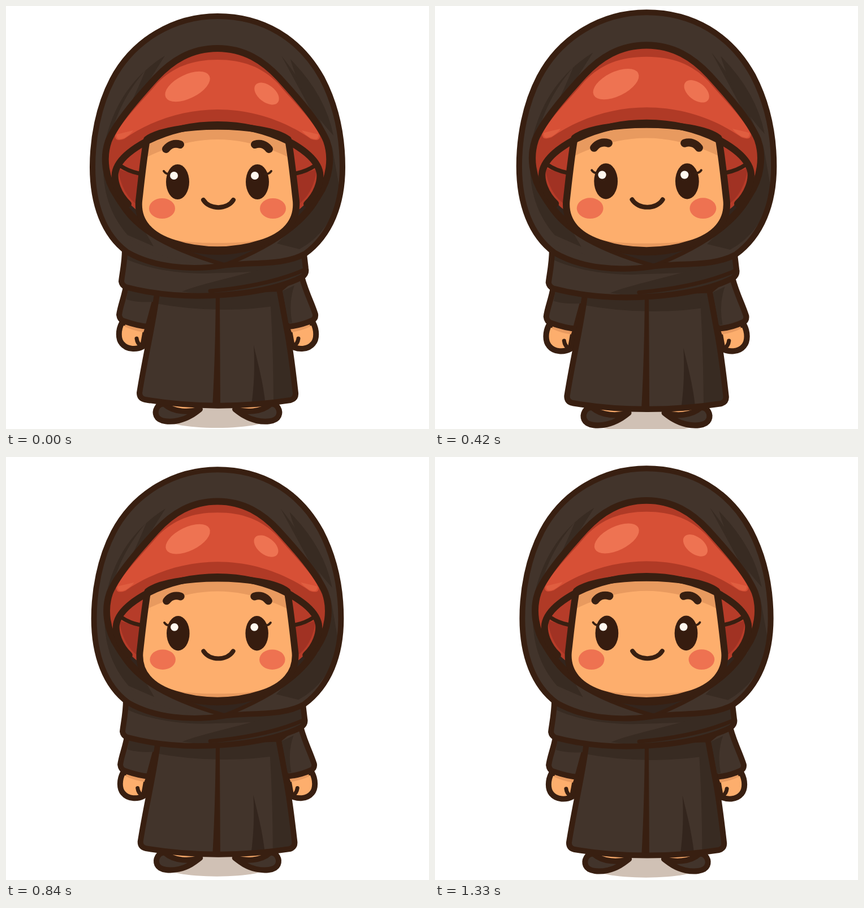
These frames come from a looping animation (748x748 px, 1400 ms). An HTML page:

```html
<!DOCTYPE html>
<html lang="en">
<head>
<meta charset="utf-8">
<title>Breathing character</title>
<style>
html, body { margin: 0; width: 100%; height: 100%; overflow: hidden; background: #fff; }
svg { display: block; width: 100vw; height: 100vh; }
.line { fill: none; stroke: #381f11; stroke-width: 10; stroke-linecap: round; stroke-linejoin: round; }
.thin { stroke-width: 7; }
.bold { stroke-width: 12; }
.cloth { fill: #42342b; }
.shade { fill: #382b22; }
.deep { fill: #33251d; }
.ink { fill: #361c0f; }
.skin { fill: #fdae6d; }
.tan { fill: #e89a5f; }
.red { fill: #d75036; }
.dark-red { fill: #b03a26; }
.glow { fill: #ee7352; }
</style>
</head>
<body>
<svg viewBox="0 0 748 748">
<defs>
  <path id="hood" d="M375 18C298 18 226 60 189 130C164 178 154 235 154 285C154 350 174 405 215 435C262 462 325 468 385 459C440 452 490 460 530 438C575 405 596 350 596 285C596 230 586 178 560 128C521 57 455 18 375 18Z"/>
  <path id="opening" d="M375 75C328 75 294 97 266 127C236 160 196 205 182 239C172 268 176 305 197 336C222 378 280 434 375 434C470 434 528 378 553 336C574 305 578 268 568 239C554 205 514 160 484 127C456 97 422 75 375 75Z"/>
  <path id="face" d="M250 236C244 270 240 310 236 345C233 381 256 407 300 420C345 435 405 435 450 420C494 407 517 381 514 345C510 310 506 270 500 236C460 205 290 205 250 236Z"/>
  <path id="robe" d="M268 508C262 560 247 620 237 684Q237 694 247 696C330 710 420 710 504 697Q514 694 513 684C508 640 503 600 497 570L484 500Z"/>
  <path id="shawl" d="M211 430C211 455 206 475 205 487Q206 494 213 497C270 512 330 515 385 511C440 507 490 497 525 479Q533 473 531 464L527 430Z"/>
  <clipPath id="inHood"><use href="#hood"/></clipPath>
  <clipPath id="inOpening"><use href="#opening"/></clipPath>
  <clipPath id="inFace"><use href="#face"/></clipPath>
  <clipPath id="inRobe"><use href="#robe"/></clipPath>
  <clipPath id="inShawl"><use href="#shawl"/></clipPath>

  <g id="shoe">
    <path class="skin" d="M280 698H345V714L300 722L280 712Z"/>
    <path class="line cloth" d="M281 704C269 702 263 716 267 725C272 736 292 736 306 733C323 729 334 721 344 713C325 719 298 719 281 704Z"/>
  </g>
  <g id="hand">
    <path class="line skin" d="M206 560C199 573 199 589 206 597C215 608 232 608 243 602L250 563Z"/>
    <path class="tan" d="M212 563L246 571L244 577Q226 574 211 567Z"/>
    <path class="line thin" d="M232 588Q233 597 241 602"/>
  </g>
  <g id="gills">
    <path d="M196 300C200 280 225 260 250 245L238 365C215 350 198 325 196 300Z" fill="#b63c29"/>
    <path d="M199 288Q216 295 238 298L234 352Q206 334 199 288Z" fill="#a13223"/>
    <path class="line thin" d="M204 283Q217 292 236 296"/>
  </g>
  <g id="cheekEye">
    <ellipse class="ink" cx="304.500" cy="311" rx="20.500" ry="31"/>
    <path class="line" style="stroke-width:4" d="M280 292Q284 298 292 297"/>
    <path class="line" style="stroke-width:14" d="M284 253C290 245 299 242 309 245"/>
    <ellipse cx="277" cy="358" rx="23" ry="18" fill="#ee7251"/>
  </g>
</defs>

<g id="figure">
  <ellipse cx="374" cy="727" rx="98" ry="19" fill="#d0c1b5"/>
  <use href="#shoe"/>
  <use href="#shoe" transform="matrix(-1 0 0 1 750 0)"/>
  <use href="#hand"/>
  <use href="#hand" transform="matrix(-1 0 0 1 750 0)"/>

  <path class="line cloth" d="M213 496C210 515 203 530 201 546Q202 555 209 557Q235 566 252 567L268 508Z"/>
  <path class="shade" d="M217 502L264 512L261 523Q235 525 214 519Z"/>
  <path class="line cloth" d="M522 470C528 500 540 520 548 545Q549 553 542 556Q520 566 498 567L484 502Z"/>
  <path class="shade" d="M490 504L511 494Q500 525 507 560L500 561Z"/>

  <use href="#robe" class="cloth"/>
  <g clip-path="url(#inRobe)">
    <path class="shade" d="M260 500H500L500 527Q380 548 260 525Z"/>
    <path class="shade" d="M468 515C472 580 474 640 474 710H520L485 500Z"/>
    <path class="deep" d="M439 600C441 635 440 670 435 706H460C456 665 446 630 439 600Z"/>
    <path d="M372 510H379L380 710H366Q371 620 372 510Z" fill="#381f11"/>
  </g>
  <use href="#robe" class="line"/>

  <use href="#shawl" class="cloth"/>
  <g clip-path="url(#inShawl)">
    <path class="shade" d="M205 430H540V446C480 474 420 470 350 473C290 473 235 460 205 443Z"/>
    <path class="shade" d="M312 505C350 489 420 478 535 440V490L390 515Z"/>
    <path class="line thin" d="M362 504C430 498 485 486 530 466"/>
  </g>
  <use href="#shawl" class="line"/>

  <use href="#hood" class="cloth"/>
  <g clip-path="url(#inHood)">
    <path class="shade" d="M282 88C222 125 188 180 174 250C169 310 177 360 216 405L262 425L190 300L205 210Z"/>
    <path class="cloth" d="M248 113C215 151 194 193 184 240Q214 195 248 113Z"/>
    <path class="shade" d="M488 88C530 140 546 178 578 250L592 330Q575 400 520 430L480 420L555 345L565 230Z"/>
    <path class="shade" d="M504 94Q525 170 580 229Q566 157 504 94Z"/>
    <path class="deep" d="M184 300C205 370 250 420 385 459C490 420 545 370 570 300L545 335L375 430L205 335Z"/>
    <path class="line thin" d="M190 318C207 380 265 423 385 457"/>
    <path class="line thin" d="M563 319C545 368 497 415 385 459"/>
    <path class="cloth" d="M215 405C247 440 315 455 370 458Q290 468 226 432Z"/>
  </g>
  <use href="#hood" class="line"/>

  <g clip-path="url(#inOpening)">
    <use href="#opening" class="dark-red"/>
    <path class="red" d="M375 95C330 95 296 108 268 137C241 169 206 203 194 229Q193 241 210 235C260 200 320 183 375 183C432 183 490 200 540 235Q557 241 556 229C544 203 509 169 482 137C454 108 420 95 375 95Z"/>
    <path class="glow" d="M197 227Q195 240 211 233Q221 227 226 220Q209 224 197 227ZM553 227Q555 240 539 233Q529 227 524 220Q541 224 553 227Z" opacity=".4"/>
    <ellipse class="glow" cx="322" cy="142.500" rx="43" ry="21" transform="rotate(-26 322 142.500)"/>
    <ellipse class="glow" cx="462" cy="155" rx="25" ry="15" transform="rotate(38 462 155)"/>
    <path class="deep" d="M186 322Q220 345 240 346L510 346Q535 345 564 322L550 440H200Z"/>
    <use href="#gills"/>
    <use href="#gills" transform="matrix(-1 0 0 1 750 0)"/>
  </g>
  <use href="#opening" class="line bold"/>

  <use href="#face" class="skin"/>
  <g clip-path="url(#inFace)">
    <path class="tan" d="M240 205H510V272Q440 236 375 236Q310 236 240 272Z"/>
    <path class="tan" d="M241 380C270 416 320 419 375 419C430 419 480 416 509 380V440H241Z"/>
  </g>
  <use href="#face" class="line bold"/>
  <path class="line bold" d="M217 350C199 333 192 310 194 295C198 273 222 254 250 239C290 219 330 210 375 210C420 210 460 219 500 239C528 254 552 273 556 295C558 310 551 333 533 350"/>

  <use href="#cheekEye"/>
  <use href="#cheekEye" transform="matrix(-1 0 0 1 750 0)"/>
  <g fill="#fff8ef"><circle cx="298" cy="300" r="7"/><circle cx="441" cy="300" r="7"/></g>
  <path class="line" style="stroke-width:8" d="M350 343C361 360.500 392 360.500 403 343"/>
</g>
</svg>
<script>
const LOOP = 1400, STEP = 70, CENTER = 374;
const figure = document.getElementById("figure");

function draw(now) {
  const time = Math.floor((now % LOOP) / STEP) * STEP;
  const scale = 1 + 0.02 * Math.sin(2 * Math.PI * time / LOOP);
  const shift = CENTER * (1 - scale);
  figure.setAttribute("transform", `translate(${shift - 1} ${shift}) scale(${scale})`);
  requestAnimationFrame(draw);
}
draw(0);
</script>
</body>
</html>
```
